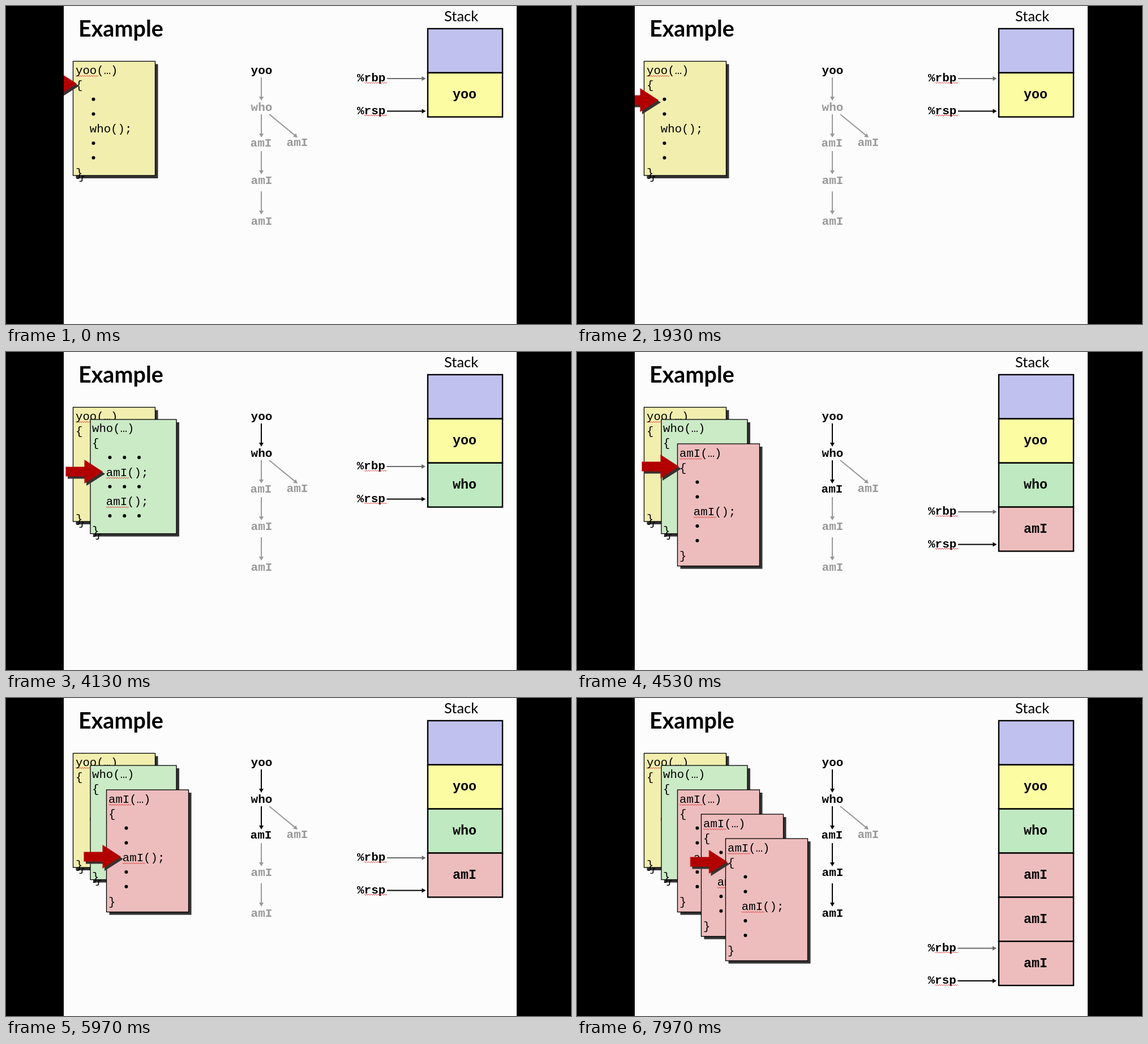
An HTML page that plays this animation: 998 by 561 pixels, repeating every 8 s.

```html
<!DOCTYPE html>
<html lang="en">
<head>
<meta charset="utf-8">
<title>Call stack example</title>
<style>
html, body { margin: 0; width: 100%; height: 100%; overflow: hidden; background: #000; }
svg { display: block; width: 998px; height: 561px; }
text { fill: currentColor; white-space: pre; }
.title { font: 700 39.5px Lato, sans-serif; }
.head { font: 25.5px Lato, sans-serif; }
.code { font: 20.7px "Liberation Mono", monospace; }
.node, .reg { font: bold 21px "Liberation Mono", monospace; }
.cell { font: bold 23.4px "Liberation Mono", monospace; }
.node, .cell { text-anchor: middle; }
.wave { fill: none; stroke: #d8322e; stroke-width: 1; }
.line { stroke: currentColor; stroke-width: 2; }
.tip { fill: currentColor; }

/* one step per function call */
.l1, .l2, .l3, .l4, #regs, #hand { animation: 8s step-end infinite; }
.l1 { animation-name: call1; }
.l2 { animation-name: call2; }
.l3 { animation-name: call3; }
.l4 { animation-name: call4; }
.tree { --off: visible; color: #999; }
@keyframes call1 { 0% { visibility: var(--off, hidden); color: #999 } 40.75%, 100% { visibility: visible; color: #000 } }
@keyframes call2 { 0% { visibility: var(--off, hidden); color: #999 } 56.5%, 100% { visibility: visible; color: #000 } }
@keyframes call3 { 0% { visibility: var(--off, hidden); color: #999 } 78.25%, 100% { visibility: visible; color: #000 } }
@keyframes call4 { 0% { visibility: var(--off, hidden); color: #999 } 99%, 100% { visibility: visible; color: #000 } }

#regs { animation-name: regs; }
@keyframes regs {
  0% { transform: translate(0, 0) }
  40.75% { transform: translate(-.5px, 74px) }
  56.5% { transform: translate(0, 154px) }
  78.25% { transform: translate(-.5px, 232px) }
  99%, 100% { transform: translate(-.5px, 313.5px) }
}
#hand { animation-name: hand; }
@keyframes hand {
  0% { transform: translate(125px, 137px) }
  24% { transform: translate(144px, 166px) }
  29.875% { transform: translate(144px, 190px) }
  35.25% { transform: translate(144px, 215px) }
  40.75% { transform: translate(152px, 157px) }
  46.125% { transform: translate(171px, 183px) }
  51.125% { transform: translate(171px, 211px) }
  56.5% { transform: translate(180px, 202px) }
  61.5% { transform: translate(203.5px, 228px) }
  67.125% { transform: translate(203.5px, 254px) }
  72.75% { transform: translate(203px, 280px) }
  78.25% { transform: translate(222px, 246px) }
  83.625% { transform: translate(243.5px, 270px) }
  89% { transform: translate(243.5px, 296px) }
  92.75% { transform: translate(243.5px, 322px) }
  99%, 100% { transform: translate(265.5px, 289px) }
}
</style>
</head>
<body>
<svg viewBox="0 0 998 561">
  <rect x="102" width="800" height="561" fill="#fcfcfd"/>
  <text class="title" x="128" y="54">Example</text>
  <text class="head" x="774" y="27">Stack</text>
  <g id="cards"></g>
  <g id="tree"></g>
  <g id="stack"></g>
  <g id="regs"></g>
  <g id="hand">
    <path d="M4 4l-33-21v12.5h-33v17h33V25z" fill="#3a3030"/>
    <path d="M0 0l-32.500-21v12.500h-33v17h33V21z" fill="#b20000"/>
  </g>
  <path d="M0 0H102V561H0zM902 0H998V561H902z"/>
</svg>
<script>
const STEP = 25.8, CHAR = 12.42;
const YELLOW = '#f1eeae', GREEN = '#cbeac6', RED = '#edbdbd';
const put = (id, html) => document.getElementById(id).innerHTML = html;
const text = (cls, x, y, s) => `<text class="${cls}" x="${x}" y="${y}">${s}</text>`;
const wave = (x, y, w) => `<path class="wave" d="M${x} ${y}${'l2 2l2-2'.repeat(Math.round(w / 4))}"/>`;

function arrow(x1, y1, x2, y2) {
  const a = Math.atan2(y2 - y1, x2 - x1);
  const ex = x2 - 5 * Math.cos(a), ey = y2 - 5 * Math.sin(a);
  return `<path class="line" d="M${x1} ${y1}L${ex} ${ey}"/>` +
    `<path class="tip" d="M0 0L-7-4V4z" transform="translate(${x2} ${y2}) rotate(${a * 180 / Math.PI})"/>`;
}

// Code lines: "*" stands for a bullet, a leading "~" marks a misspelt word.
function card(level, x, y, w, h, fill, tx, base, lines, echo) {
  const last = base + 7 * STEP;
  let out = `<rect x="${x + 5}" y="${y + 5}" width="${w}" height="${h}" fill="#333"/>`;
  if (echo) out += text('code', tx + 5, last + 5, '}');
  out += `<rect x="${x}" y="${y}" width="${w}" height="${h}" fill="${fill}" stroke="#000" stroke-width="1.3"/>`;
  lines.forEach((s, i) => {
    const ly = base + i * STEP, lx = tx + (i > 1 && i < 7 ? 2 * CHAR : 0);
    if (s[0] === '*') {
      for (let n = 0; n < s.length; n++)
        out += `<circle cx="${lx + 6.6 + n * 25.8}" cy="${ly - 7}" r="3"/>`;
      return;
    }
    if (s[0] === '~') {
      s = s.slice(1);
      out += wave(lx, ly + 2.5, 40);
    }
    out += text('code', lx, ly, s);
  });
  return `<g class="l${level}">${out}</g>`;
}

const yoo = ['~yoo(…)', '{', '*', '*', 'who();', '*', '*', '}'];
const who = ['who(…)', '{', '***', '~amI();', '***', '~amI();', '***', '}'];
const amI = ['~amI(…)', '{', '*', '*', '~amI();', '*', '*', '}'];
put('cards',
  card(0, 118.5, 97.5, 145, 201.5, YELLOW, 123, 120, yoo, true) +
  card(1, 149, 119, 152, 201.5, GREEN, 152, 141.3, who, true) +
  [[177.5, 162], [219.5, 205], [262.5, 248]].map(([x, y], i) =>
    card(i + 2, x, y, 145, 215.5, RED, x + 3.5, y + 23, amI)).join(''));

const node = (level, s, x, y, ...line) =>
  `<g class="tree l${level}">${text('node', x, y, s)}${line.length ? arrow(...line) : ''}</g>`;
put('tree',
  text('node', 451.5, 120, 'yoo') +
  node(1, 'who', 451.5, 185, 451, 126, 451, 167) +
  node(2, 'amI', 450.5, 248, 451, 191, 451, 232) +
  node(5, 'amI', 514.5, 247, 465, 191, 515, 232) +
  node(3, 'amI', 451.5, 314, 451, 256, 451, 297) +
  node(4, 'amI', 451.5, 386, 451, 327, 451, 368));

const cells = [['', '#c1c1ef'], ['yoo', '#fcfca2'], ['who', '#bfe9c0'], ['amI', RED], ['amI', RED], ['amI', RED]];
put('stack', cells.map(([s, fill], i) => {
  const y = 40 + i * 77.85;
  return `<g class="l${Math.max(0, i - 1)}"><rect x="745" y="${y}" width="132" height="77.85" fill="${fill}"
    stroke="#000" stroke-width="2.4"/>${text('cell', 810, y + 45.5, s)}</g>`;
}).join(''));

const reg = (s, y, color) => text('reg', 620, y, s) + wave(633, y + 1.5, 40) +
  `<g color="${color}">${arrow(673, y - 5, 741.5, y - 5)}</g>`;
put('regs', reg('%rbp', 133, '#6a6a6a') + reg('%rsp', 190.5, '#000'));
</script>
</body>
</html>
```
